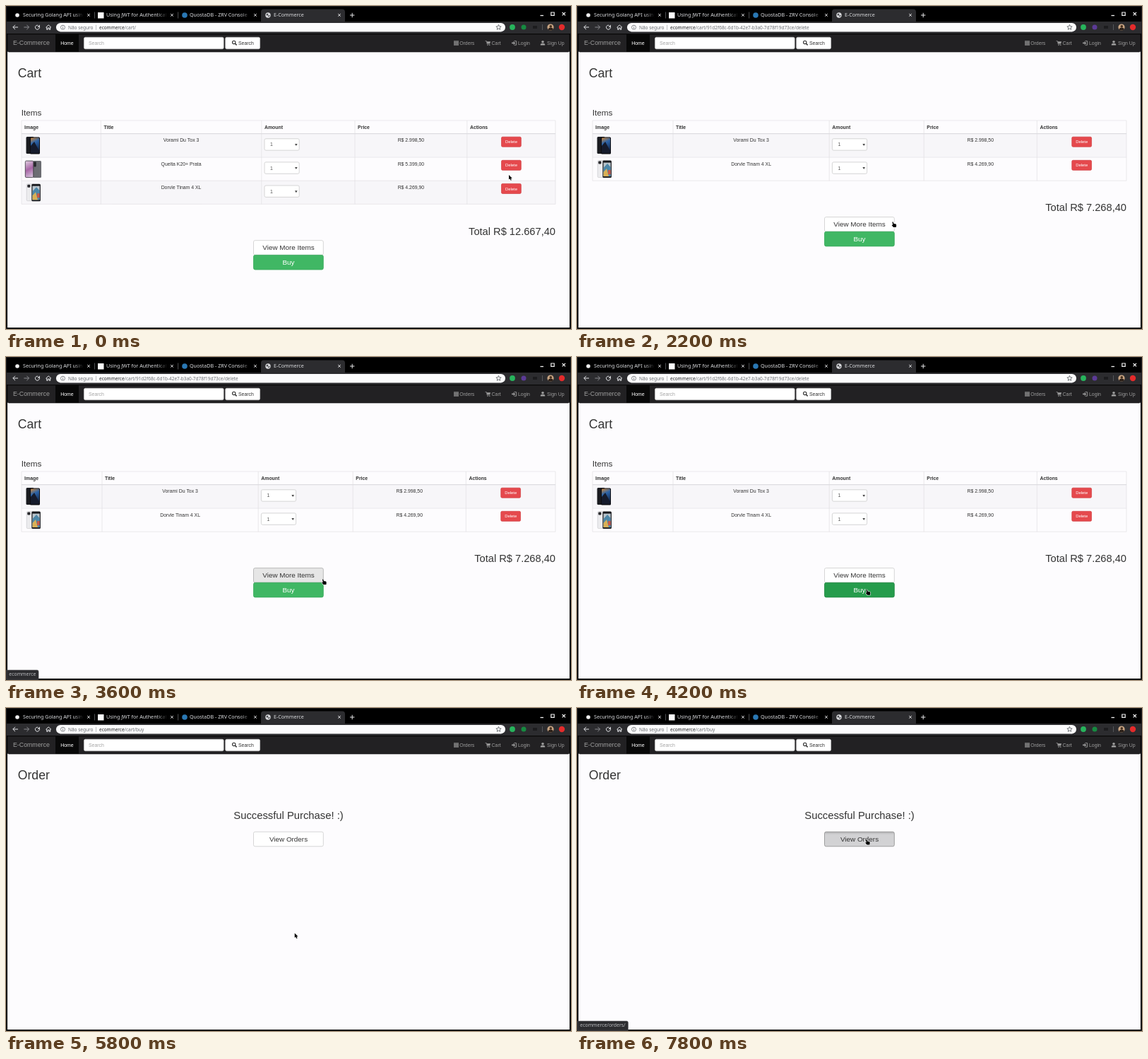
An HTML page with a canvas for the animation above (8 s loop, 800 px wide and 457 px high).

```html
<!DOCTYPE html>
<html lang="en">
<head>
<meta charset="utf-8">
<title>E-Commerce</title>
<style>
html, body { margin: 0; width: 100%; height: 100%; overflow: hidden; background: #000; }
canvas { display: block; width: 800px; height: 457px; }
</style>
</head>
<body>
<canvas id="stage"></canvas>
<script>
const W = 800, H = 457, LOOP = 8000, STEP = 200;
const canvas = document.getElementById('stage');
const ratio = window.devicePixelRatio || 1;
canvas.width = W * ratio;
canvas.height = H * ratio;
const c = canvas.getContext('2d');

const UI = '"Noto Sans", sans-serif';
const PAGE = '"Liberation Sans", Arial, sans-serif';

// ---------- helpers ----------
function rect(x, y, w, h, fill) {
  c.fillStyle = fill;
  c.fillRect(x, y, w, h);
}

function box(x, y, w, h, r, fill, stroke, lw = 0.8) {
  c.beginPath();
  c.roundRect(x, y, w, h, r);
  if (fill) { c.fillStyle = fill; c.fill(); }
  if (stroke) { c.strokeStyle = stroke; c.lineWidth = lw; c.stroke(); }
}

function disc(x, y, r, fill) {
  c.beginPath();
  c.arc(x, y, r, 0, Math.PI * 2);
  c.fillStyle = fill;
  c.fill();
}

function line(points, color, lw = 1) {
  c.beginPath();
  points.forEach(([x, y], i) => i ? c.lineTo(x, y) : c.moveTo(x, y));
  c.strokeStyle = color;
  c.lineWidth = lw;
  c.stroke();
}

function poly(points, fill) {
  c.beginPath();
  points.forEach(([x, y]) => c.lineTo(x, y));
  c.closePath();
  c.fillStyle = fill;
  c.fill();
}

// y is the middle of the capitals; returns the width
function text(s, x, y, size, color, { font = PAGE, align = 'left', weight = '' } = {}) {
  c.font = `${weight} ${size}px ${font}`;
  c.textAlign = align;
  c.fillStyle = color;
  c.fillText(s, x, y + size * 0.36);
  return c.measureText(s).width;
}

function cross(x, y, r, color, lw = 1) {
  line([[x - r, y - r], [x + r, y + r]], color, lw);
  line([[x - r, y + r], [x + r, y - r]], color, lw);
}

// ---------- browser ----------
function tab(x, title) {
  const fade = c.createLinearGradient(x + 72, 0, x + 86, 0);
  fade.addColorStop(0, '#dcdde0');
  fade.addColorStop(1, 'rgba(220,221,224,0)');
  c.save();
  c.beginPath();
  c.rect(x, 4, 87, 18);
  c.clip();
  text(title, x, 12.8, 7.15, fade, { font: UI });
  c.restore();
  cross(x + 93, 12.8, 1.8, '#e4e4e6', 1);
}

function globe(x, y) {
  disc(x, y, 3.7, '#d9dadd');
  poly([[x - 2.8, y - 1.2], [x - 0.2, y - 2.4], [x + 0.4, y - 0.4], [x - 1.2, y + 1]], '#4a4b50');
  poly([[x + 0.8, y], [x + 2.8, y + 0.3], [x + 1.2, y + 2.5], [x, y + 1.6]], '#4a4b50');
}

function star(x, y, r) {
  const points = [];
  for (let i = 0; i < 11; i++) {
    const a = -Math.PI / 2 + i * Math.PI / 5, d = i % 2 ? r * 0.45 : r;
    points.push([x + d * Math.cos(a), y + d * Math.sin(a)]);
  }
  line(points, '#55585d', 0.8);
}

function addressBar(url) {
  const gray = '#6a6d72', y = 30.2;
  box(71, 24, 636, 12.4, 6.2, '#fcfcfd');
  c.beginPath();
  c.arc(80.5, y, 3, 0, 7);
  c.strokeStyle = gray;
  c.lineWidth = 0.8;
  c.stroke();
  rect(80.1, 29.8, 0.8, 2.2, gray);
  rect(80.1, 28.3, 0.8, 0.8, gray);
  text('Não seguro', 88, y, 6.5, gray, { font: UI });
  rect(127, 26.8, 0.7, 7, '#a5a7ab');
  const host = text('ecommerce', 132, y, 6.45, '#202124', { font: UI });
  text(url, 132 + host, y, 6.45, gray, { font: UI });
  star(697.5, y, 3.8);
}

function browser(url, loading, extColor) {
  rect(0, 0, W, H, '#000');
  box(0.5, 0.5, W - 1, H - 1, 0, null, '#1c1c1e', 1);
  box(361, 4.5, 119, 22, [4, 4, 0, 0], '#2c2c2f');
  rect(1, 22, 798, 17, '#2c2c2f');

  disc(16, 13, 2.8, '#f0f0f0');
  rect(130, 9, 8.5, 8.5, '#fafafa');
  disc(253, 13, 3.8, '#2a78b4');
  if (!loading) globe(371, 13);
  tab(24, 'Securing Golang API using');
  tab(142, 'Using JWT for Authentication');
  tab(260, 'QuostaDB - ZRV Console');
  tab(379, 'E-Commerce');
  rect(125.2, 8.5, 0.7, 9, '#707175');
  rect(243.4, 8.5, 0.7, 9, '#707175');
  line([[487, 13], [493.4, 13]], '#e8e8ea');
  line([[490.2, 9.8], [490.2, 16.2]], '#e8e8ea');

  line([[756.5, 13.5], [761, 13.5]], '#f0f0f0', 1.3);
  box(771.8, 9, 4.4, 4.4, 0, null, '#f0f0f0', 1.2);
  cross(789.8, 11.2, 2.2, '#f0f0f0', 1.2);

  const ink = '#e2e3e6', dim = '#8a8b8f';
  line([[17, 30], [9.8, 30]], ink);
  line([[13, 26.8], [9.8, 30], [13, 33.2]], ink);
  line([[25.4, 30], [32.6, 30]], dim);
  line([[29.4, 26.8], [32.6, 30], [29.4, 33.2]], dim);
  if (loading) {
    cross(44.5, 30, 2.8, ink, 1.1);
  } else {
    c.beginPath();
    c.arc(44.4, 30.2, 3, -0.6, Math.PI * 1.6, false);
    c.strokeStyle = ink;
    c.lineWidth = 1;
    c.stroke();
    poly([[47.8, 26.4], [47.8, 29.8], [44.4, 29.8]], ink);
  }
  line([[56.4, 30.3], [60.2, 26.9], [64, 30.3]], ink, 1);
  line([[57.7, 29.8], [57.7, 33.3], [59.2, 33.3], [59.2, 31], [61.2, 31], [61.2, 33.3], [62.7, 33.3], [62.7, 29.8]], ink, 1);

  addressBar(url);

  disc(717, 30, 3.9, '#27b45c');
  disc(733, 30, 3.5, extColor);
  rect(746, 28, 6, 4, '#1c1c1e');
  rect(759, 26, 0.7, 8, '#66676b');
  disc(771, 30, 4.6, '#c9a583');
  c.save();
  c.beginPath();
  c.arc(771, 30, 4.6, 0, 7);
  c.clip();
  disc(771.3, 28.8, 1.8, '#44301f');
  disc(771.3, 34.2, 3.7, '#2b2019');
  c.restore();
  disc(787, 30, 4.2, '#e32b2b');
}

function status(label) {
  c.font = `6.9px ${UI}`;
  const w = c.measureText(label).width;
  box(1, 443, w + 7, 13.2, [0, 2, 0, 0], '#2c2c2f', '#4a4a4d', 0.6);
  text(label, 4.3, 448.9, 6.9, '#b9babd', { font: UI });
}

// ---------- page ----------
function navbar() {
  const gray = '#9d9d9d', y = 52.3;
  rect(2, 52, 796, 403, '#fdfcfe');
  rect(2, 39, 796, 13, '#0a0a0a');
  box(2, 40, 796, 25, [0, 0, 2, 2], '#222123', '#0a0a0a', 0.6);
  text('E-Commerce', 10, y, 8.8, gray);
  rect(70, 40, 33, 25, '#080808');
  text('Home', 77.2, y, 6.9, '#fff');
  box(110.4, 44.2, 197.8, 16.6, 2, '#fff', '#ccc', 0.6);
  text('Search', 117, y, 6.9, '#a5a5a5');
  box(310.6, 44.2, 49, 16.6, 2, '#fff', '#ccc', 0.6);
  c.beginPath();
  c.arc(322.7, 51.4, 2.2, 0, 7);
  c.strokeStyle = '#333';
  c.lineWidth = 1.1;
  c.stroke();
  line([[324.2, 53], [326.6, 55.4]], '#333', 1.5);
  text('Search', 329, y, 6.9, '#333');

  for (let i = 0; i < 4; i++) rect(634, 49.4 + i * 1.7, 7, 1.1, gray);
  text('Orders', 642.2, y, 6.9, gray);
  line([[678.6, 49.6], [680.3, 49.6], [681.4, 54], [685.2, 54]], gray, 0.8);
  poly([[680.7, 50.2], [686, 50.2], [685.3, 53], [681.3, 53]], gray);
  disc(682, 55.2, 0.7, gray);
  disc(684.8, 55.2, 0.7, gray);
  text('Cart', 687.6, y, 6.9, gray);
  line([[719.5, 49.6], [722.6, 49.6], [722.6, 55.2], [719.5, 55.2]], gray, 0.9);
  rect(716, 51.6, 2.6, 1.6, gray);
  poly([[718.4, 50], [721.4, 52.4], [718.4, 54.8]], gray);
  text('Login', 725, y, 6.9, gray);
  disc(760, 50.7, 1.8, gray);
  box(756.8, 53, 6.4, 2.6, [1.6, 1.6, 0, 0], gray);
  text('Sign Up', 766, y, 6.9, gray);
}

const phones = {
  dark(y) {
    box(28.5, y + 4, 11, 24, 1.5, '#191a1f');
    box(34, y + 4.5, 14, 24, 1.5, '#0c0d12');
    const g = c.createLinearGradient(35, y + 5, 46, y + 27);
    g.addColorStop(0, '#d98a32');
    g.addColorStop(0.35, '#2b63a8');
    g.addColorStop(1, '#101a33');
    box(35, y + 5.5, 12, 21.5, 1, g);
    poly([[35, y + 17], [40, y + 11], [47, y + 24], [47, y + 27], [35, y + 27]], '#151b2c');
  },
  violet(y) {
    box(38, y + 5, 12, 24, 1.5, '#6c6d73');
    box(39.3, y + 6.3, 3.4, 7, 0.8, '#25262a');
    const g = c.createLinearGradient(27, y + 5, 39, y + 28);
    g.addColorStop(0, '#e4d3e4');
    g.addColorStop(0.5, '#a866a6');
    g.addColorStop(1, '#d9cbe0');
    box(27.3, y + 5, 11.5, 23.5, 1.5, g, '#343239', 0.8);
  },
  white(y) {
    box(29.2, y + 4.5, 10, 24, 1.5, '#ececee', '#c4c4c8', 0.6);
    box(30.3, y + 5.5, 4, 4, 1, '#27272b');
    box(36.3, y + 4.5, 12.6, 24.5, 1.5, '#18191d');
    rect(37.5, y + 7.5, 10.2, 19.5, '#b9c4cc');
    poly([[37.5, y + 15], [43, y + 9], [47.7, y + 14], [47.7, y + 27], [37.5, y + 27]], '#4c87a8');
    poly([[37.5, y + 21], [42, y + 16], [45, y + 27], [37.5, y + 27]], '#d9b055');
    rect(44, y + 18, 3.7, 6, '#c65748');
  }
};

const items = [
  { name: 'Vorami Du Tox 3', price: 'R$ 2.998,50', phone: 'dark' },
  { name: 'Quelta K20+ Prata', price: 'R$ 5.399,00', phone: 'violet' },
  { name: 'Dorvle Tinam 4 XL', price: 'R$ 4.269,90', phone: 'white' }
];
const carts = [
  { rows: items, cols: [22, 134.3, 361.8, 494, 652.8, 778], total: '12.667,40' },
  { rows: [items[0], items[2]], cols: [22, 136, 357.2, 491.2, 651.3, 778], total: '7.268,40' }
];

function bigButton(y, label, fill, border, color, pressed) {
  box(350.5, y, 98.8, 20.6, 2.2, fill, border, 0.8);
  if (pressed) {
    const g = c.createLinearGradient(0, y, 0, y + 4);
    g.addColorStop(0, 'rgba(0,0,0,.16)');
    g.addColorStop(1, 'rgba(0,0,0,0)');
    box(350.8, y + 0.3, 98.2, 5, 2, g);
  }
  text(label, 400, y + 10.1, 9.9, color, { align: 'center' });
}

function whiteButton(y, label, mode) {
  const [fill, border] = { idle: ['#fff', '#ccc'], hover: ['#e6e6e6', '#adadad'], press: ['#d2d2d4', '#8c8c8c'] }[mode];
  bigButton(y, label, fill, border, '#333', mode === 'press');
}

function cartPage(cart, s) {
  const { rows, cols, total } = cart, dark = '#333';
  text('Cart', 16.8, 94.8, 17.6, dark);
  text('Items', 21.8, 150.4, 11.7, dark);
  const bottom = 181 + rows.length * 33.1;
  ['Image', 'Title', 'Amount', 'Price', 'Actions'].forEach((h, i) =>
    text(h, cols[i] + 4.1, 171.2, 6.9, dark, { weight: 'bold' }));
  rows.forEach((row, i) => {
    const y = 181 + i * 33.1, mid = k => (cols[k] + cols[k + 1]) / 2;
    if (i % 2 === 0) rect(22, y, 756, 33.1, '#f7f6f9');
    phones[row.phone](y);
    text(row.name, mid(1), y + 9, 6.9, dark, { align: 'center' });
    const sx = cols[2] + 4.2;
    box(sx, y + 6.8, 49.2, 16.4, 2, '#fff', '#ccc', 0.8);
    text('1', sx + 8, y + 15, 6.9, '#555');
    poly([[sx + 43, y + 14], [sx + 46.6, y + 14], [sx + 44.8, y + 17]], '#444');
    text(row.price, mid(3), y + 9, 6.9, dark, { align: 'center' });
    const hot = i === 1 && s.overDelete;
    box(mid(4) - 13.9, y + 4.2, 27.8, 14, 1.6, hot ? '#cf3c41' : '#e5494d', hot ? '#a82a2e' : '#d23c40', 0.7);
    text('Delete', mid(4), y + 11.2, 5.9, '#fff', { align: 'center' });
  });
  const rule = '#dddce0';
  cols.forEach(x => line([[x, 162], [x, bottom]], rule, 0.6));
  line([[22, 162], [778, 162]], rule, 0.6);
  line([[22, 180.6], [778, 180.6]], rule, 1.1);
  rows.forEach((r, i) => line([[22, 214.1 + i * 33.1], [778, 214.1 + i * 33.1]], rule, 0.6));

  text('Total R$ ' + total, 778, bottom + 38, 14.65, dark, { align: 'right' });
  const y = bottom + 51.4;
  whiteButton(y, 'View More Items', s.overView ? 'hover' : 'idle');
  bigButton(y + 20.7, 'Buy', s.overBuy ? '#269c4c' : '#40b764', s.overBuy ? '#1f8741' : '#37a95a', '#fff', s.buying);
  if (s.buying) {
    box(350.2, y + 20.4, 99.4, 21.2, 2.2, null, '#6fa6d8', 0.6);
    c.setLineDash([1, 1]);
    box(351.6, y + 21.8, 96.6, 18.4, 1, null, '#9fd6b2', 0.6);
    c.setLineDash([]);
  }
}

function orderPage(mode) {
  text('Order', 16.8, 94.8, 17.6, '#333');
  text('Successful Purchase! :)', 400, 152, 14.8, '#333', { align: 'center' });
  whiteButton(175.2, 'View Orders', mode);
}

// ---------- pointer ----------
// seconds, x, y
const path = [
  [0, 712, 239], [0.4, 718, 228.5], [1.2, 718, 228.5], [2.2, 447, 305.5],
  [2.4, 441, 308], [3.4, 441, 308], [3.6, 448.5, 314.5], [4.4, 403, 332],
  [5.6, 403, 332], [6.6, 458, 202], [6.8, 431, 187], [7.4, 409.5, 186], [8, 409.5, 186]
];

function pointerAt(sec) {
  let i = 0;
  while (i < path.length - 2 && sec >= path[i + 1][0]) i++;
  const [t0, x0, y0] = path[i], [t1, x1, y1] = path[i + 1];
  let p = Math.min(1, (sec - t0) / (t1 - t0));
  p = p * p * (3 - 2 * p);
  return [x0 + (x1 - x0) * p, y0 + (y1 - y0) * p];
}

function pointer(x, y, hand) {
  const arrow = [[0, 0], [0, 6.6], [1.5, 5.3], [2.6, 7.8], [3.8, 7.3], [2.8, 4.9], [4.7, 4.7]];
  const finger = [[-0.6, 0], [0.7, 0], [1.5, 2.4], [4.6, 3], [5.2, 4.4], [4.9, 7.4], [1, 7.6], [-1.3, 4.8], [-0.7, 4], [0.3, 4.4]];
  const pts = (hand ? finger : arrow).map(([dx, dy]) => [x + dx, y + dy]);
  c.lineJoin = 'round';
  line([...pts, pts[0]], 'rgba(255,255,255,.85)', 1.2);
  poly(pts, '#000');
  c.lineJoin = 'miter';
}

// ---------- timeline ----------
function draw(ms) {
  const t = Math.floor(ms / STEP) * STEP;
  const during = (a, b) => t >= a && t < b;
  const ordered = t >= 5200, removed = t >= 600;
  const url = ordered ? '/cart/buy' : removed ? '/cart/91d2f68c-6d1b-42e7-b3a0-7d78f19d73ce/delete' : '/cart/';
  const ext = during(600, 1400) ? '#27348f' : during(1400, 5800) ? '#5b3a96' : '#168a40';

  c.setTransform(ratio, 0, 0, ratio, 0, 0);
  browser(url, during(5000, 5200), ext);
  navbar();
  if (ordered) {
    orderPage(t >= 7800 ? 'press' : t >= 6800 ? 'hover' : 'idle');
  } else {
    cartPage(carts[removed ? 1 : 0], {
      overDelete: during(400, 600) || during(1000, 1400),
      overView: during(2400, 3800),
      overBuy: during(4000, 5200),
      buying: during(4800, 5200)
    });
  }
  if (during(2600, 4000)) status('ecommerce');
  if (t >= 7000) status('ecommerce/orders/');
  const hand = during(400, 1400) || during(2200, 5000) || t >= 6800;
  pointer(...pointerAt(t / 1000), hand);
}

const start = performance.now();
function tick() {
  draw((performance.now() - start) % LOOP);
  requestAnimationFrame(tick);
}
tick();
</script>
</body>
</html>
```
